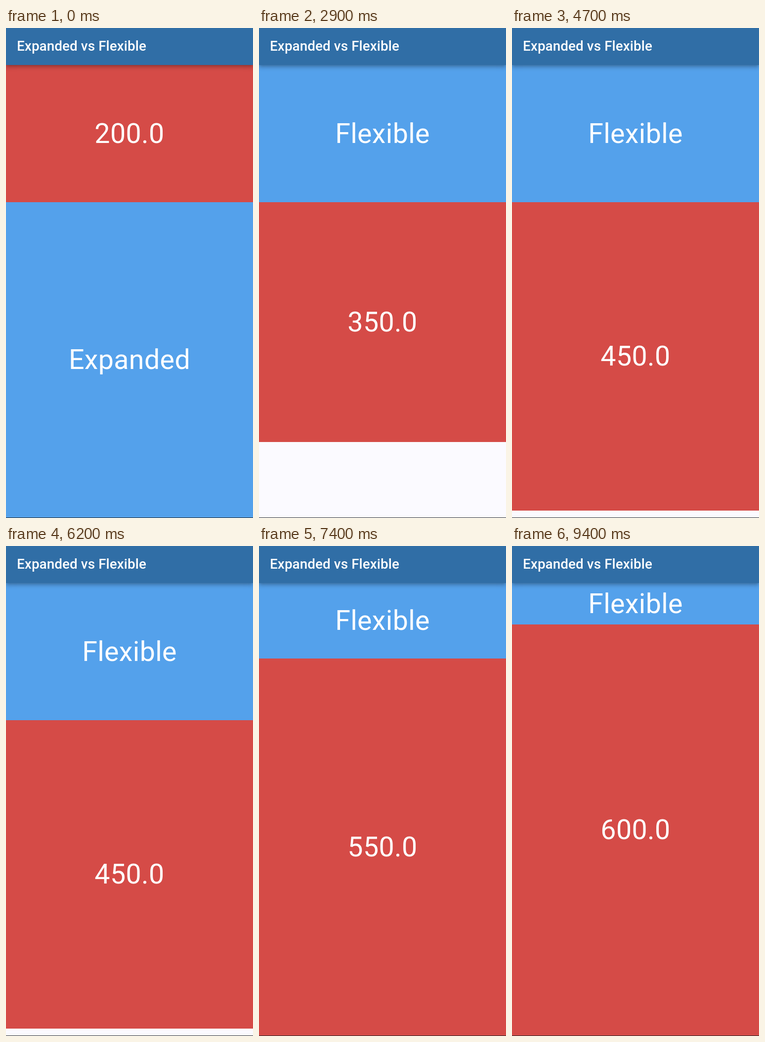
An HTML page that plays this animation: 500 px wide and 993 px high, repeating every 9.5 s.

```html
<!DOCTYPE html>
<html lang="en">
<head>
<meta charset="utf-8">
<title>Expanded vs Flexible</title>
<style>
  html, body { margin: 0; width: 100%; height: 100%; overflow: hidden; }

  body {
    position: relative;
    font-family: Roboto, sans-serif;
    color: #fff;
    background: #fbfaff;
  }

  .bar {
    position: absolute;
    inset: 0 0 auto;
    height: 75.4px;
    z-index: 1;
    background: #306ea6;
    box-shadow: 0 2.8px 5.6px -1.4px #0003, 0 5.6px 7px #00000024, 0 1.4px 14px #0000001f;
  }

  h1 {
    position: absolute;
    left: 22px;
    top: 21.3px;
    margin: 0;
    font: 500 27.78px/32px Roboto, sans-serif;
    letter-spacing: .1px;
    white-space: nowrap;
  }

  /* Later scenes cover earlier ones, so each only needs a start time. */
  .scene {
    position: absolute;
    inset: 75.4px 0 1px;
    display: flex;
    flex-direction: column;
    background: #fbfaff;
    animation: 9.5s step-end infinite;
  }

  .box {
    flex: none;
    height: calc(var(--size) * 1.3885px);
    display: flex;
    align-items: center;
    justify-content: center;
    font-size: 55.56px;
    line-height: 65px;
    letter-spacing: .35px;
  }

  .red { background: #d54b47; }
  .blue { background: #54a1eb; }
  .fill { flex: 1; }

  .edge {
    position: absolute;
    inset: auto 0 0;
    height: 1px;
    background: #25282c;
  }

  .s350 { animation-name: at2900; }
  .s450 { animation-name: at4200; }
  .s550 { animation-name: at6300; }
  .s600 { animation-name: at7500; }

  @keyframes at2900 { 0% { visibility: hidden; } 30.526%, 100% { visibility: visible; } }
  @keyframes at4200 { 0% { visibility: hidden; } 44.21%, 100% { visibility: visible; } }
  @keyframes at6300 { 0% { visibility: hidden; } 66.315%, 100% { visibility: visible; } }
  @keyframes at7500 { 0% { visibility: hidden; } 78.947%, 100% { visibility: visible; } }
</style>
</head>
<body>
  <header class="bar"><h1>Expanded vs Flexible</h1></header>

  <div class="scene">
    <div class="box red" style="--size: 200">200.0</div>
    <div class="box blue fill">Expanded</div>
  </div>
  <div class="scene s350">
    <div class="box blue" style="--size: 200">Flexible</div>
    <div class="box red" style="--size: 350">350.0</div>
  </div>
  <div class="scene s450">
    <div class="box blue" style="--size: 200">Flexible</div>
    <div class="box red" style="--size: 450">450.0</div>
  </div>
  <div class="scene s550">
    <div class="box blue fill">Flexible</div>
    <div class="box red" style="--size: 550">550.0</div>
  </div>
  <div class="scene s600">
    <div class="box blue fill">Flexible</div>
    <div class="box red" style="--size: 600">600.0</div>
  </div>

  <div class="edge"></div>
</body>
</html>
```
